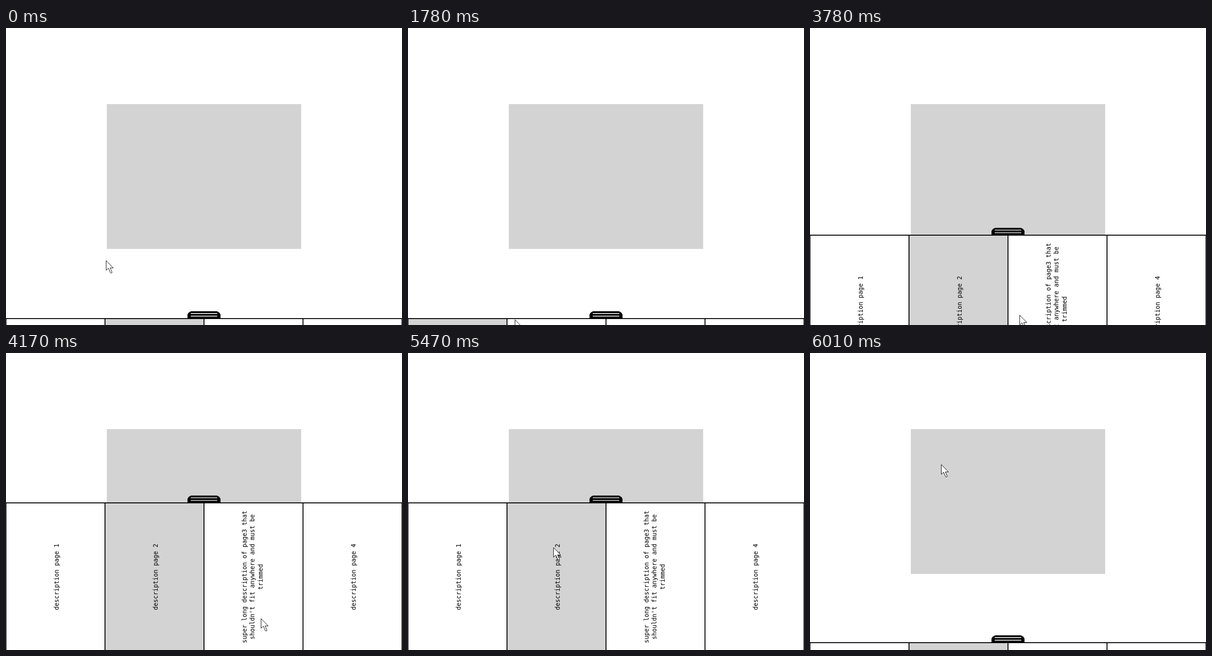
Animation of 864 by 648 pixels, one loop 6090 ms. Source, as an HTML page with a canvas:

```html
<!DOCTYPE html>
<html lang="en">
<head>
<meta charset="utf-8">
<title>Page drawer</title>
<style>
html, body { margin: 0; width: 100%; height: 100%; overflow: hidden; background: #fff; }
canvas { display: block; }
</style>
</head>
<body>
<canvas id="stage" width="864" height="648"></canvas>
<script>
const ctx = document.getElementById('stage').getContext('2d');
const LOOP = 6090;
const GRAY = '#d3d3d3';
const TILE_W = 216, TILE_H = 324;
const CLOSED_Y = 634, OPEN_Y = 327;

const pages = [
  ['description page 1'],
  ['description page 2'],
  ['super long description of page3 that', "shouldn't fit anywhere and must be", 'trimmed'],
  ['description page 4'],
];

// Pointer moves: it lands on `to` after `steps` ticks, slowing down by `power`.
const start = [218, 507];
const moves = [
  { from: 70,   until: 610,  steps: 8, to: [137, 633], power: 2 },
  { from: 690,  until: 760,  steps: 2, to: [134, 636], power: 1 },
  { from: 1540, until: 2010, steps: 7, to: [248, 636], power: 2.4 },
  { from: 2620, until: 3000, steps: 6, to: [466, 623], power: 2 },
  { from: 3250, until: 3400, steps: 3, to: [455, 626], power: 1.5 },
  { from: 3550, until: 3780, steps: 4, to: [457, 626], power: 1 },
  { from: 3860, until: 4090, steps: 4, to: [555, 579], power: 2 },
  { from: 4170, until: 4170, steps: 1, to: [556, 579], power: 1 },
  { from: 4720, until: 4940, steps: 4, to: [340, 561], power: 2 },
  { from: 5470, until: 6010, steps: 8, to: [286, 243], power: 4.2 },
];

const selections = [[0, 1], [1310, 0], [2390, 1], [4320, 2], [5090, 1]];

const clamp = u => Math.min(1, Math.max(0, u));
const swing = u => 0.5 - Math.cos(Math.PI * clamp(u)) / 2;
const mix = (a, b, u) => a + (b - a) * u;

// Pointer position and the time of the last tick.
function pointerAt(t) {
  let pos = start, tick = 0;
  for (const { from, until, steps, to, power } of moves) {
    if (t < from) break;
    const gap = steps > 1 ? (until - from) / (steps - 1) : 1;
    const i = Math.min(steps - 1, Math.floor((t - from + 5) / gap));
    const u = 1 - (1 - (i + 1) / steps) ** power;
    pos = pos.map((v, k) => Math.round(mix(v, to[k], u)));
    tick = from + i * gap;
  }
  return { pos, tick };
}

function drawerY(t) {
  const opened = swing((t - 3500) / 500) - swing((t - 5552) / 485);
  return Math.round(mix(CLOSED_Y, OPEN_Y, opened));
}

function drawHandle(y) {
  ctx.beginPath();
  ctx.moveTo(396, y + 1);
  ctx.lineTo(396, y - 9);
  ctx.quadraticCurveTo(398, y - 14, 404, y - 16);
  ctx.lineTo(460, y - 16);
  ctx.quadraticCurveTo(466, y - 14, 468, y - 9);
  ctx.lineTo(468, y + 1);
  ctx.closePath();
  ctx.rect(403, y - 12, 58, 1.7);
  ctx.rect(403, y - 6.3, 58, 1.7);
  ctx.fillStyle = '#000';
  ctx.fill('evenodd');
}

function drawLabel(lines, x, y) {
  const first = lines.length > 1 ? -15.5 : 6.5;
  ctx.save();
  ctx.translate(x + TILE_W / 2, y + TILE_H / 2 - 0.5);
  ctx.rotate(-Math.PI / 2);
  ctx.fillStyle = '#000';
  lines.forEach((line, i) => ctx.fillText(line, 0, first + i * 17.5));
  ctx.restore();
}

function drawDrawer(y, selected) {
  drawHandle(y);
  ctx.lineWidth = 2;
  ctx.strokeStyle = '#000';
  pages.forEach((lines, i) => {
    const x = i * TILE_W;
    ctx.fillStyle = i === selected ? GRAY : '#fff';
    ctx.fillRect(x, y, TILE_W, TILE_H);
    drawLabel(lines, x, y);
  });
  pages.forEach((_, i) => ctx.strokeRect(i * TILE_W, y, TILE_W, TILE_H));
}

function drawPointer([x, y]) {
  const outline = [[0, 0], [0, 21], [5, 16.5], [9, 25.5], [10, 27], [12, 27],
    [13, 25.5], [8.7, 16], [15.5, 16]];
  ctx.beginPath();
  for (const [dx, dy] of outline) ctx.lineTo(x + dx + 0.5, y + dy + 0.5);
  ctx.closePath();
  ctx.fillStyle = '#fff';
  ctx.fill();
  ctx.lineWidth = 1;
  ctx.strokeStyle = '#000';
  ctx.stroke();
}

function draw(t) {
  const { pos, tick } = pointerAt(t);
  const selected = selections.filter(([time]) => time <= t).pop()[1];
  ctx.fillStyle = '#fff';
  ctx.fillRect(0, 0, 864, 648);
  ctx.fillStyle = GRAY;
  ctx.fillRect(220, 166, 424, 316);
  drawDrawer(drawerY(tick), selected);
  drawPointer(pos);
}

ctx.font = '13.333px "DejaVu Sans Mono", monospace';
ctx.textAlign = 'center';
ctx.lineJoin = 'round';

function frame() {
  draw(performance.now() % LOOP);
  requestAnimationFrame(frame);
}
frame();
</script>
</body>
</html>
```
